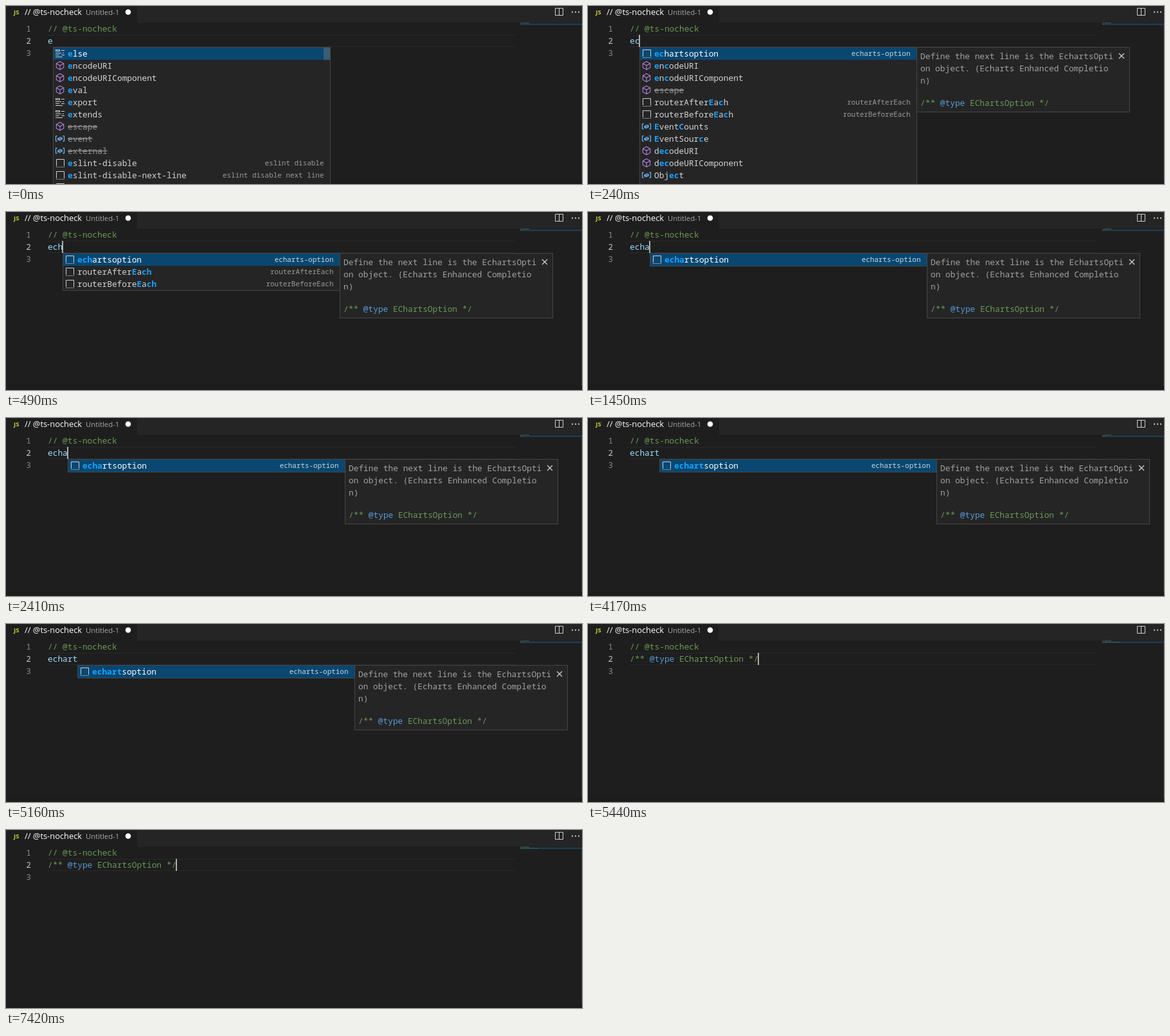
An HTML page for the animation above (7.69 s loop, 896 by 278 pixels).

```html
<!DOCTYPE html>
<html lang="en">
<head>
<meta charset="utf-8">
<title>Editor completion</title>
<style>
  html, body { margin: 0; width: 100%; height: 100%; overflow: hidden; background: #1e1e1e; }
  svg { display: block; width: 896px; height: 278px; }
  text { white-space: pre; font: 12.83px "Noto Sans Mono", monospace; fill: #d4d4d4; }
  .ui { font-family: "Open Sans", sans-serif; }
  .num { fill: #858585; text-anchor: end; }
  .com { fill: #6a9955; }
  .tag { fill: #569cd6; }
  .typed { fill: #9cdcfe; }
  .hit { fill: #18a3ff; font-weight: 600; }
  .on { fill: #fff; font-weight: 500; }
  .old { fill: #929292; text-decoration: line-through; }
  .info { font-size: 10.95px; fill: #9b9b9b; text-anchor: end; }
  .info.on { fill: #ccd8e0; }
  .doc { fill: #a2a2a2; }
  .box { fill: #252526; stroke: #454545; }
  .line { fill: none; stroke: #d0d0d0; }
</style>
</head>
<body>
<svg viewBox="0 0 896 278">
  <defs>
    <path id="keyword" fill="#d0d0d0" d="M15 4h-5V3h5zM14 7h-2v1h2zM10 7H1v1h9zM12 13H1v1h11zM7 10H1v1h6zM15 10h-5v1h5zM8 2v3H1V2zM7 3H2v1h5z" fill-rule="evenodd"/>
    <path id="method" fill="none" stroke="#b180d7" stroke-width="1.1" d="M8 1.7L13.7 4.8V11.2L8 14.4L2.3 11.2V4.8ZM2.3 4.8L8 8L13.7 4.8M8 8V14.4"/>
    <path id="variable" fill="none" stroke="#75beff" stroke-width="1.1" d="M4 4H1.5V12H4M12 4H14.5V12H12M4.8 8L8.6 5.8L11.2 7V9L7.4 10.8L4.8 9.6ZM4.8 8L7.4 9L11.2 7"/>
    <g id="snippet" fill="none" stroke="#d0d0d0">
      <path d="M2.5 13V2.5H14.5V13"/>
      <path d="M2 14.5H15" stroke-dasharray="1 1"/>
    </g>
  </defs>

  <rect width="896" height="278" fill="#1e1e1e"/>
  <rect y="271" width="896" height="7" fill="#1c1c1c"/>
  <rect x="204" width="692" height="26" fill="#252526"/>
  <text class="ui" x="12" y="13" style="font-size:9.5px;font-weight:700;fill:#cbcb41">JS</text>
  <text class="ui" x="29" y="14" style="font-size:12.9px;fill:#fff">// @ts-nocheck</text>
  <text class="ui" x="124" y="14" style="font-size:11.3px;fill:#a8a8a8">Untitled-1</text>
  <circle cx="190" cy="9.5" r="4.3" fill="#fff"/>
  <path class="line" d="M854.5 3.5H866.5V14.5H854.5ZM860.5 3.5V14.5"/>
  <path d="M880 9.5h2m3 0h2m3 0h2" stroke="#d0d0d0" stroke-width="2"/>

  <path class="line" d="M65 45.5H792M65 63.5H792" style="stroke:#292929"/>
  <text class="num" x="39" y="40">1</text>
  <text class="num" x="39" y="59" style="fill:#c6c6c6">2</text>
  <text class="num" x="39" y="78">3</text>
  <text class="com" x="65" y="40">// @ts-nocheck</text>

  <path d="M800 28.5H896" stroke="#1f4360" stroke-width="2"/>
  <path d="M800 26.5H814" stroke="#6a9955" stroke-dasharray="2 1 11" opacity=".5"/>
  <path d="M895.5 26V271" stroke="#353535"/>

  <g id="scenes"></g>
  <rect id="cursor" y="45" width="2" height="19" fill="#aeafad"/>
</svg>

<script>
const LOOP = 7690;
const ROW = 19;
const typeTag = [['com', '/** '], ['tag', '@type'], ['com', ' EChartsOption */']];

// Items: icon, label with matches between asterisks, detail, deprecated
const option = label => ['snippet', label, 'echarts-option'];
const listE = [
  ['keyword', '*e*lse'],
  ['method', '*e*ncodeURI'],
  ['method', '*e*ncodeURIComponent'],
  ['method', '*e*val'],
  ['keyword', '*e*xport'],
  ['keyword', '*e*xtends'],
  ['method', 'escape', '', true],
  ['variable', 'event', '', true],
  ['variable', 'external', '', true],
  ['snippet', '*e*slint-disable', 'eslint disable'],
  ['snippet', '*e*slint-disable-next-line', 'eslint disable next line'],
  ['snippet', '*e*slint-enable', 'eslint enable']
];
const listEc = [
  option('*ec*hartsoption'),
  ['method', '*e*n*c*odeURI'],
  ['method', '*e*n*c*odeURIComponent'],
  ['method', 'escape', '', true],
  ['snippet', 'routerAfter*E*a*c*h', 'routerAfterEach'],
  ['snippet', 'routerBefore*E*a*c*h', 'routerBeforeEach'],
  ['variable', '*E*vent*C*ounts'],
  ['variable', '*E*ventSour*c*e'],
  ['method', 'd*ec*odeURI'],
  ['method', 'd*ec*odeURIComponent'],
  ['variable', 'Obj*ec*t'],
  ['variable', 'Refl*ec*t']
];
const listEch = [
  option('*ech*artsoption'),
  ['snippet', 'routerAfter*E*a*ch*', 'routerAfterEach'],
  ['snippet', 'routerBefore*E*a*ch*', 'routerBeforeEach']
];

const scenes = [
  { at: 0, word: 'e', list: listE, thumb: true },
  { at: 240, word: 'ec', list: listEc, doc: true },
  { at: 490, word: 'ech', list: listEch, doc: true },
  { at: 1450, word: 'echa', list: [option('*echa*rtsoption')], doc: true },
  { at: 2940, word: 'echar', list: [option('*echar*tsoption')], doc: true },
  { at: 3770, word: 'echart', list: [option('*echart*soption')], doc: true },
  { at: 5440 }
];

// The cursor starts hidden and flips at each of these times
const blinks = [240, 1050, 1450, 1880, 2410, 3500, 3770, 4170, 4760, 5160, 5440, 5810, 6370, 6900, 7420];

const text = (x, y, cls, body) => `<text x="${x}" y="${y}" class="${cls}">${body}</text>`;
const spans = parts => parts.map(([cls, s]) => `<tspan class="${cls}">${s}</tspan>`).join('');
const left = word => Math.round(65 + 7.66 * word.length);

function item([icon, label, detail, old], i, x) {
  const y = 65 + ROW * i;
  const on = i ? '' : 'on';
  const parts = label.split('*').map((s, k) => [k % 2 ? 'hit' : on, s]).filter(p => p[1]);
  return (on && `<rect x="${x + 1}" y="${y}" width="430" height="${ROW}" fill="#094771"/>`) +
    `<use href="#${icon}" x="${x + 3}" y="${y + 1}"/>` +
    (old ? text(x + 23, y + 14, 'old', label) : text(x + 23, y + 14, '', spans(parts))) +
    (detail ? text(x + 421.5, y + 13, 'info ' + on, detail) : '');
}

function docPanel(x) {
  const lines = ['Define the next line is the EchartsOpti', 'on object. (Echarts Enhanced Completio', 'n)'];
  return `<rect class="box" x="${x + .5}" y="64.5" width="331" height="101"/>` +
    lines.map((s, i) => text(x + 6, 83 + ROW * i, 'doc', s)).join('') +
    text(x + 6, 156, '', spans(typeTag)) +
    `<path class="line" stroke-width="1.3" d="M${x + 315} 74l8 8m0 -8l-8 8"/>`;
}

function miniLine(width) {
  return `<path d="M800 28.5h${width}" stroke="#6a9955" stroke-dasharray="2 1" opacity=".5"/>`;
}

function scene({ word, list, doc, thumb }) {
  if (!word) return text(65, 59, '', spans(typeTag)) + miniLine(28);
  const x = left(word);
  return text(65, 59, 'typed', word) + miniLine(word.length) +
    `<rect class="box" x="${x + .5}" y="64.5" width="431" height="${ROW * list.length + 1}"/>` +
    list.map((it, i) => item(it, i, x)).join('') +
    (thumb ? `<rect x="${x + 421}" y="65" width="10" height="19" fill="#797979" opacity=".45"/>` : '') +
    (doc ? docPanel(x + 431) : '');
}

const root = document.getElementById('scenes');
const cursor = document.getElementById('cursor');
root.innerHTML = scenes.map(s => `<g>${scene(s)}</g>`).join('');
const groups = [...root.children];

function draw() {
  const t = performance.now() % LOOP;
  const now = scenes.filter(s => s.at <= t).length - 1;
  groups.forEach((g, i) => g.setAttribute('display', i === now ? 'inline' : 'none'));
  const { word } = scenes[now];
  cursor.setAttribute('x', word ? left(word) - 1 : 264);
  cursor.setAttribute('display', blinks.filter(b => b <= t).length % 2 ? 'inline' : 'none');
  requestAnimationFrame(draw);
}
draw();
</script>
</body>
</html>
```
